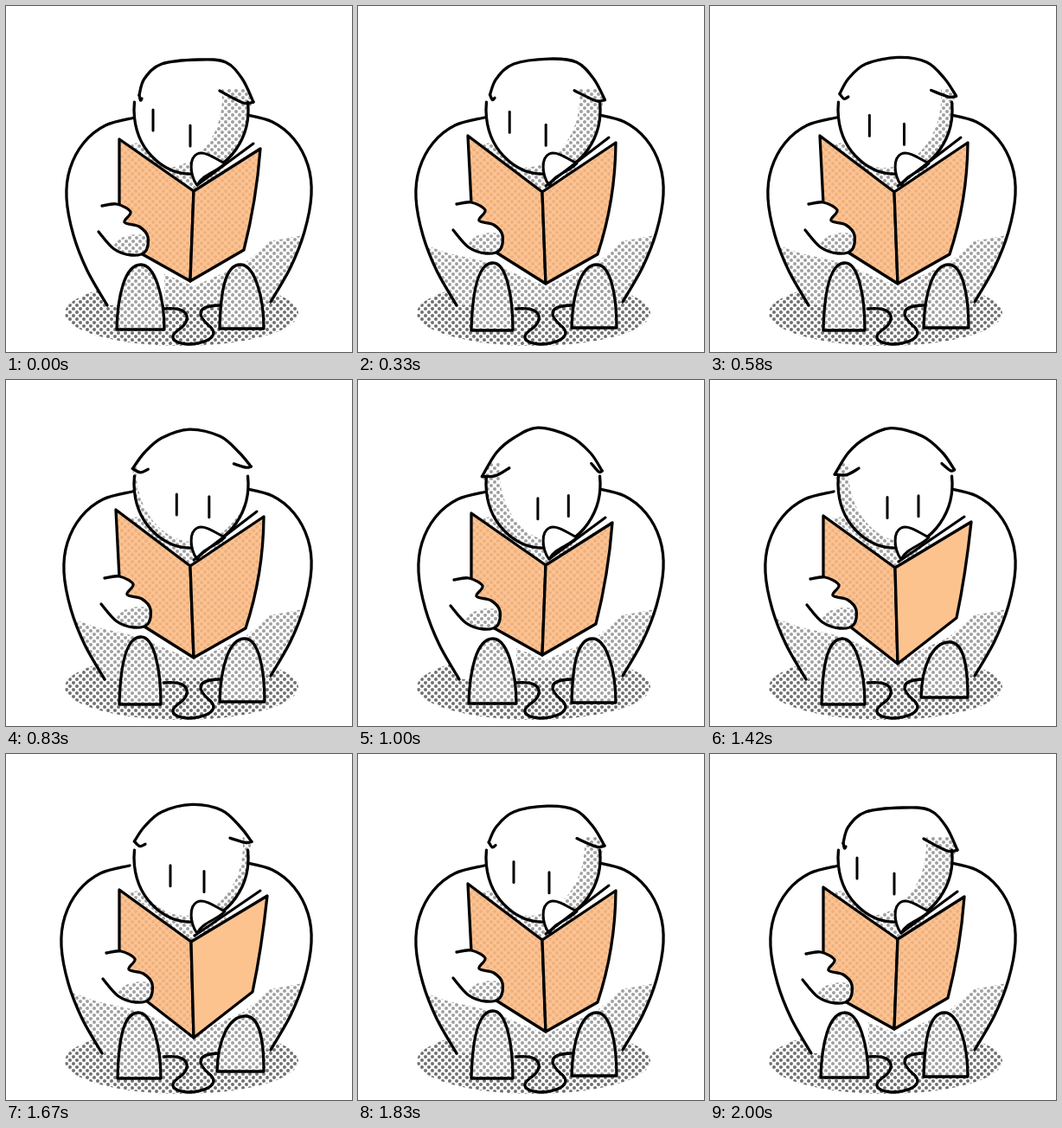
Write an HTML page with a canvas that moves like this. It is 400 px wide and 400 px high and loops after 2080 ms.

```html
<!DOCTYPE html>
<html lang="en">
<head>
<meta charset="utf-8">
<title>Reading</title>
<style>
html, body { margin: 0; width: 100%; height: 100%; overflow: hidden; background: #fff; }
canvas { display: block; }
</style>
</head>
<body>
<canvas id="stage" width="400" height="400"></canvas>
<script>
const ctx = document.getElementById('stage').getContext('2d');
const LOOP = 2080, LAST = 24, FAR = 14;
const CELL = 8;

// Three redrawings of the book and feet that alternate on every step.
// Feet: left, right, peak, top, base.
const poses = [
  {
    spine: [[217, 214], [213, 318]], left: [[131, 154], [131, 272]], right: [[294, 165], [275, 282]],
    bow: 5, dottedRight: true, hand: [-3, 2], shadeFrom: 183,
    feet: [[128, 183, 156, 299, 374], [247, 298, 271, 299, 373]]
  },
  {
    spine: [[213, 215], [217, 321]], left: [[127, 150], [133, 268]], right: [[298, 158], [277, 287]],
    bow: 10, dottedRight: true, hand: [0, 0], shadeFrom: 60,
    feet: [[131, 179, 156, 297, 375], [247, 299, 276, 299, 372]]
  },
  {
    spine: [[214, 217], [217, 328]], left: [[131, 157], [131, 261]], right: [[302, 164], [285, 275]],
    bow: 2, dottedRight: false, hand: [2, 1], shadeFrom: 60,
    feet: [[129, 179, 153, 299, 375], [244, 298, 277, 303, 367]]
  }
];

const side = [[146, 129], [112, 138], [87, 158], [71, 188], [67, 222], [75, 265], [91, 306], [114, 346]];
const shade = [[60, 270], [105, 286], [150, 296], [217, 324], [275, 298], [305, 272], [360, 262], [360, 360], [60, 360]];
const neck = [[140, 160], [214, 217], [255, 190], [214, 150]];
const paw = [[114, 229], [131, 227], [147, 236], [140, 248], [157, 253], [167, 265], [164, 282], [148, 286], [128, 279], [110, 259]];
const tail = new Path2D('M183 350 C215 347 214 365 200 374 C184 385 198 391 214 391 C240 388 246 378 234 369 C222 358 218 347 247 346');
const nose = new Path2D('M220 206 C213 195 211 176 221 171 C230 167 243 177 253 182 C242 193 228 194 221 207');

function makeDots(color) {
  const tile = document.createElement('canvas');
  tile.width = tile.height = CELL;
  const g = tile.getContext('2d');
  g.fillStyle = color;
  for (const c of [CELL / 4, CELL * 3 / 4]) {
    g.beginPath();
    g.arc(c, c, 2, 0, 7);
    g.fill();
  }
  return ctx.createPattern(tile, 'repeat');
}
const dark = makeDots('#707070');
const grey = makeDots('#a0a0a0');
const tan = makeDots('#edb083');

const mix = (a, b, p) => a + (b - a) * p;

// Smooth curve through the points.
function curve(pts, path = new Path2D(), join = false) {
  const get = i => pts[Math.max(0, Math.min(pts.length - 1, i))];
  if (join) path.lineTo(...pts[0]);
  else path.moveTo(...pts[0]);
  for (let i = 0; i < pts.length - 1; i++) {
    const [p, a, b, n] = [get(i - 1), get(i), get(i + 1), get(i + 2)];
    path.bezierCurveTo(
      a[0] + (b[0] - p[0]) / 6, a[1] + (b[1] - p[1]) / 6,
      b[0] - (n[0] - a[0]) / 6, b[1] - (n[1] - a[1]) / 6,
      b[0], b[1]);
  }
  return path;
}

function polygon(pts) {
  const path = new Path2D();
  for (const p of pts) path.lineTo(...p);
  path.closePath();
  return path;
}

function oval(x, y, rx, ry) {
  const path = new Path2D();
  path.ellipse(x, y, rx, ry, 0, 0, 7);
  return path;
}

function fill(path, style = '#fff') {
  ctx.fillStyle = style;
  ctx.fill(path);
}

function ink(path, width = 3.3) {
  ctx.lineWidth = width;
  ctx.stroke(path);
}

function within(path, draw) {
  ctx.save();
  ctx.clip(path);
  draw();
  ctx.restore();
}

function drawFoot([l, r, peak, top, base]) {
  const foot = new Path2D();
  foot.moveTo(l, base);
  foot.bezierCurveTo(l + 1, base - 38, peak - 19, top, peak, top);
  foot.bezierCurveTo(peak + 16, top, r, base - 38, r, base);
  foot.closePath();
  fill(foot);
  fill(foot, grey);
  ink(foot);
}

function drawBody(pose, k) {
  fill(oval(203, 355, 135, 38), dark);
  const left = side.map(([x, y]) => [x + 3 * (1 - k), y]);
  const right = side.map(([x, y]) => [420 - x, y - 4]);
  const trunk = curve([...right].reverse(), curve(left), true);
  trunk.closePath();
  fill(trunk);
  within(trunk, () => {
    fill(polygon(neck), grey);
    ctx.beginPath();
    ctx.rect(pose.shadeFrom, 0, 400, 400);
    ctx.clip();
    fill(polygon(shade), grey);
  });
  ink(curve(left));
  ink(curve(right));
  ink(tail);
  pose.feet.forEach(drawFoot);
}

// turn runs from 1 (looking left) to -1 (looking right).
function drawHead(turn) {
  const p = (1 - turn) / 2;
  const flap = 1 - Math.abs(turn);
  const tipL = [mix(154, 140, p), mix(103, 122, p) - 12 * flap];
  const foldL = [mix(157, 187, p) - 10 * flap, mix(107, 100, p)];
  const tipR = [mix(286, 281, p), 111 - 12 * flap];
  const foldR = [mix(247, 277, p), mix(98, 96, p)];
  const skull = [
    tipL, [160, 84], [180, 67], [213 + 10 * turn, 57.5 + 4.5 * turn],
    [248 + 6 * turn, 65], [270 + 3 * turn, 84], tipR
  ];
  const earL = [tipL, [mix(tipL[0], foldL[0], 0.5), mix(tipL[1], foldL[1], 0.5) + 4], foldL];
  const earR = [tipR, [mix(tipR[0], foldR[0], 0.3), tipR[1] + 1], foldR];
  const face = new Path2D();
  face.ellipse(214, 120, 66, 74, 0, -0.12, Math.PI + 0.12);

  const head = curve(skull);
  head.ellipse(214, 120, 66, 74, 0, 0, Math.PI);
  head.closePath();
  fill(head);
  within(head, () => {
    const shadow = oval(214 - 30 * turn, 105, 66, 82);
    shadow.rect(100, 0, 220, 230);
    ctx.clip(shadow, 'evenodd');
    ctx.fillStyle = grey;
    ctx.fillRect(100, 96, 220, 130);
  });
  for (const part of [skull, earL, earR]) ink(curve(part));
  ink(face);

  const eyes = [[195 - 25 * turn, 143 - 11 * turn], [233 - 20 * turn, 147 + 3 * turn]];
  for (const [x, y] of eyes) ink(curve([[x, y - 12], [x, y + 12]]), 3);
}

function drawBook({ spine, left, right, bow, dottedRight, hand }) {
  const [top, foot] = spine;
  const l = polygon([top, foot, left[1], left[0]]);
  const r = new Path2D();
  r.moveTo(...top);
  r.lineTo(...right[0]);
  r.quadraticCurveTo((right[0][0] + right[1][0]) / 2 + bow, 225, ...right[1]);
  r.lineTo(...foot);
  r.closePath();
  for (const page of [l, r]) {
    fill(page, '#fdc38f');
    if (page === l || dottedRight) fill(page, tan);
    ink(page);
  }
  fill(nose);
  ink(curve([[top[0] + 4, top[1] - 7], [right[0][0] - 8, right[0][1] - 6]]), 3);
  ink(nose, 3);

  ctx.save();
  ctx.translate(...hand);
  const shape = curve(paw);
  fill(shape);
  within(shape, () => fill(oval(154, 282, 28, 20), grey));
  ink(shape);
  ctx.restore();
}

// Eases slowly into the page, then swings back evenly.
function turnAt(step) {
  if (step <= FAR) return 1 - 2 * (step / FAR) ** 1.8;
  return 2 * (step - FAR) / (LAST - FAR) - 1;
}

// Twelve drawings a second, on a clock of 10 ms ticks.
function stepAt(t) {
  let step = 0;
  while (step < LAST && Math.round((step + 1) * 100 / 12) * 10 <= t) step++;
  return step;
}

function render(step) {
  const k = step % poses.length;
  ctx.fillStyle = '#fff';
  ctx.fillRect(0, 0, 400, 400);
  ctx.strokeStyle = '#000';
  ctx.lineCap = ctx.lineJoin = 'round';
  drawBody(poses[k], k);
  drawHead(turnAt(step));
  drawBook(poses[k]);
}

let start = null;
function tick(now) {
  if (start === null) start = now;
  render(stepAt((now - start) % LOOP));
  requestAnimationFrame(tick);
}
render(0);
requestAnimationFrame(tick);
</script>
</body>
</html>
```
